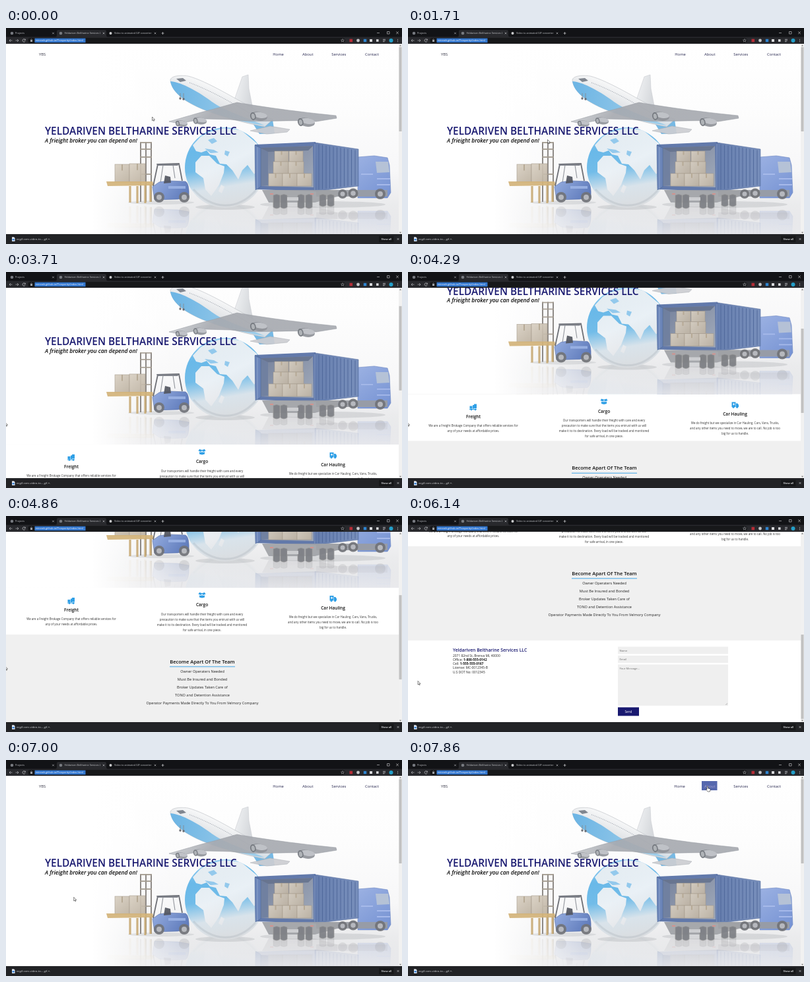
Animation of 600x328 px, one loop 8000 ms. Source, as an HTML page with a canvas:

```html
<!DOCTYPE html>
<html lang="en">
<head>
<meta charset="utf-8">
<title>Freight broker page</title>
<style>
html, body { margin: 0; width: 100%; height: 100%; overflow: hidden; background: #fff; }
canvas { display: block; width: 600px; height: 328px; }
</style>
</head>
<body>
<canvas id="stage"></canvas>
<script>
const LOOP = 8000, STEP = 1000 / 7;
const NAVY = '#191970', SKY = '#2f9fe6', INK = '#222';
const FACE = '"Open Sans", "Noto Sans", sans-serif';
const stage = document.getElementById('stage');
const dpr = window.devicePixelRatio || 1;
stage.width = 600 * dpr;
stage.height = 328 * dpr;
const c = stage.getContext('2d');

// [time, value] pairs, straight lines between them
const scrollKeys = [[3430, 0], [3714, 51], [4857, 204], [5857, 338], [6143, 338], [6571, 97], [6857, 0]];
const xKeys = [[143, 221.5], [1143, 211.5], [2714, 211.5], [3286, -1.5], [5143, -1.5], [5714, 15], [6857, 15], [7571, 453]];
const yKeys = [[143, 135], [1143, 169.5], [2714, 169.5], [3286, 228], [5143, 228], [5714, 250.5], [6857, 250.5], [7571, 40]];

function at(keys, t) {
  if (t <= keys[0][0]) return keys[0][1];
  for (let i = 1; i < keys.length; i++) {
    const [t0, a] = keys[i - 1], [t1, b] = keys[i];
    if (t <= t1) return a + (b - a) * (t - t0) / (t1 - t0);
  }
  return keys[keys.length - 1][1];
}

function box(color, x, y, w, h) {
  c.fillStyle = color;
  c.fillRect(x, y, w, h);
}

function shape(d, fill, stroke, width = 0.6) {
  const p = new Path2D(d);
  if (fill) { c.fillStyle = fill; c.fill(p); }
  if (stroke) { c.strokeStyle = stroke; c.lineWidth = width; c.stroke(p); }
}

function oval(color, x, y, rx, ry = rx, turn = 0) {
  c.fillStyle = color;
  c.beginPath();
  c.ellipse(x, y, rx, ry, turn, 0, Math.PI * 2);
  c.fill();
}

function text(s, x, y, size, color = INK, style = '', align = 'left') {
  c.font = `${style} ${size}px ${FACE}`;
  c.textAlign = align;
  c.textBaseline = 'alphabetic';
  c.fillStyle = color;
  c.fillText(s, x, y + size * 0.34);
}

function fade(x0, y0, x1, y1, ...colors) {
  const g = c.createLinearGradient(x0, y0, x1, y1);
  colors.forEach((k, i) => g.addColorStop(i / (colors.length - 1), k));
  return g;
}

function engine(x, y, s) {
  oval('#8f9399', x, y, 12 * s, 6.2 * s, 0.15);
  oval('#c3c6cb', x + 2 * s, y - 1.5 * s, 10 * s, 4 * s, 0.15);
  oval('#74787f', x - 8 * s, y, 4 * s, 5.6 * s, -0.2);
  oval('#b4b7bc', x - 8 * s, y, 2.4 * s, 3.8 * s, -0.2);
}

function plane() {
  shape('M345 112L358 74L367 71L368 92L375 128Z', fade(348, 90, 372, 95, '#eceef0', '#d3d6da'), '#c6c9ce');
  shape('M366 132L386 136L404 139L407 160L384 161Z', '#6cb4e2');
  shape('M370 156L400 149L430 154L426 158L395 161Z', '#ccced2', '#aeb1b6');
  shape('M249 79C250 73 262 71 276 73C304 80 352 110 404 139L392 150C350 142 300 128 272 110C258 100 250 90 249 79Z',
    fade(300, 85, 285, 120, '#f4f5f6', '#cfd3d8'), '#b3b6bc');
  shape('M249 81C263 82 285 92 312 112C332 126 354 132 392 148C350 142 300 128 272 110C259 101 251 92 249 81Z',
    fade(255, 85, 370, 140, '#63b1e4', '#98cbea'));
  shape('M258 77L268 76L273 80L264 82Z', '#767d87');
  c.setLineDash([1, 1.6]);
  shape('M278 83C310 95 340 112 372 131', null, '#838a96', 1);
  c.setLineDash([]);
  shape('M264 99V106M269 99V107', null, '#888', 0.9);
  oval('#62656b', 264, 107, 1.7);
  oval('#62656b', 269, 108, 1.7);
  shape('M247 142C266 137 290 129 315 123L350 113C400 122 460 129 500 133L501 137L470 142C430 138 380 145 340 139L300 138L262 145Z',
    fade(270, 120, 300, 145, '#c6c9cd', '#a7aab0'), '#989ba2');
  engine(266, 145, 0.75);
  engine(294, 141, 0.85);
  engine(383, 134, 1.08);
  engine(455, 143, 1.08);
}

function globe() {
  c.save();
  c.beginPath();
  c.arc(332, 212, 61, 0, Math.PI * 2);
  c.clip();
  box(fade(310, 151, 330, 273, '#8ccaf0', '#5db3e7', '#66b7e7', '#d7e2ea', '#d9dcdf'), 270, 150, 125, 125);
  const land = fade(290, 160, 340, 268, '#eceff1', '#f4f5f7', '#dde0e4');
  shape('M283 178L295 165L308 158L330 152L356 155L380 175L392 205L376 222L366 208L358 216L352 230L343 216L334 207L324 206L318 194L309 192L304 186L296 189L288 187Z', land);
  shape('M296 194L308 194L320 206L331 210L330 220L323 238L311 255L302 245L299 228L287 219L287 204Z', land);
  shape('M326 238l5 3l-4 10l-5-3Z', land);
  shape('M306 170l9-3l5 5l-8 4Z M332 186l7 2l-3 7l-5-3Z M301 183l14 2l7 4l-12 1Z', '#8cc6ec');
  c.restore();
  shape('M284 245C312 276 350 278 378 247', null, 'rgba(130,140,150,.2)', 3);
}

function crate(x, y, w, h) {
  box(fade(x, y, x + w, y + h, '#d8cfc1', '#bdb2a2'), x, y, w, h);
  c.strokeStyle = '#a3988a';
  c.lineWidth = 0.6;
  c.strokeRect(x, y, w, h);
  box('#b5a893', x + w / 2 - 1, y, 2, h * 0.35);
}

function wheel(x, y, r, hub = '#bcbec3') {
  oval('#717378', x, y, r);
  oval(hub, x, y, r * 0.5);
}

function forklift() {
  shape('M204 173V264M212 173V264M220 173V264', null, '#85817d', 2);
  shape('M203 174H221M203 184H221M203 196H221M203 222H221', null, '#a39b8f', 1.8);
  crate(165, 207, 22, 27);
  crate(187, 206, 24, 28);
  shape('M152 233L222 233L224 239L154 240Z', '#d3b47a');
  shape('M188 240V265M199 240V266M211 238V266M219 238V264', null, '#c9ac78', 3.2);
  shape('M223 240L230 207L262 206L267 232', null, '#63656c', 1.8);
  shape('M228 206H263L260 209H229Z', '#777a83');
  shape('M238 208L234 235M253 208L256 228', null, '#888b93', 1.1);
  shape('M222 241L232 234L246 232L272 233Q278 236 277 257L260 260L225 261Z',
    fade(225, 232, 265, 262, '#8aa4dc', '#5573b8'), '#4f68a4');
  shape('M241 224L249 226L250 235L239 236Z', '#53565f');
  shape('M246 240H272V244H246Z', '#9bb2e4');
  wheel(232, 257, 8);
  wheel(270, 257, 8);
}

function truck() {
  shape('M533 196L558 194L578 197L581 208L583 250L578 258L533 258Z', fade(535, 195, 583, 255, '#92aae0', '#6b8ad0'), '#6a83bd');
  shape('M560 203L579 203L581 219L562 220Z', '#b9c4d6');
  shape('M538 222H556M562 229H582M562 238H582', null, '#aabcec', 1.8);
  shape('M470 246H578V256H470Z', '#9a9da3');
  shape('M468 174L534 184L534 240L468 248Z', fade(468, 0, 534, 0, '#5a74a8', '#6d86b6'), '#526b9c');
  for (let x = 474; x < 533; x += 5.5) {
    const k = (x - 468) / 66;
    shape(`M${x} ${176 + k * 10}V${246 - k * 8}`, null, '#4f6899', 1);
  }
  shape('M377 177L469 173L470 248L378 245Z', '#566fa4');
  shape('M385 182L465 179L466 242L386 240Z', fade(385, 180, 440, 242, '#77829a', '#a0a8b6'));
  shape('M385 182L397 188V239L386 240Z', '#6f7f9f');
  shape('M385 182L465 179L458 186L397 188Z', '#66748f');
  crate(407, 187, 21, 16);
  crate(429, 187, 21, 16);
  crate(405, 203, 23, 18);
  crate(428, 203, 23, 18);
  crate(398, 221, 21, 19);
  crate(419, 221, 22, 19);
  crate(441, 221, 22, 19);
  shape('M377 178L386 182V241L378 246Z', '#6c87bb', '#4c6697');
  shape('M381 181V244M468 176V246', null, '#a4b5d6', 0.7);
  shape('M388 246H502V256L468 265H398Z', '#a0a2a7');
  for (const x of [410, 421, 447, 459, 480, 492]) {
    const h = x < 465 ? 21 : 18;
    shape(`M${x - 5} 254q5-3 10 0v${h - 3}q-5 4-10 0Z`, '#7d7f84', '#999', 0.8);
  }
  box('#d0d1d4', 426, 257, 17, 5);
  box('#d5928e', 400, 251, 5, 2);
  box('#d5928e', 461, 251, 5, 2);
  wheel(510, 252, 7);
  wheel(526, 251, 7.5);
  wheel(567, 252, 8);
}

function hero() {
  c.save();
  c.beginPath();
  c.rect(0, 24, 595, 289);
  c.clip();
  box(fade(0, 24, 0, 313, '#fff', '#fdfdfd', '#f7f7f8', '#e0e1e3'), 0, 24, 595, 289);
  c.save();
  c.translate(0, 536);
  c.scale(1, -1);
  c.globalAlpha = 0.2;
  globe();
  forklift();
  truck();
  c.restore();
  box(fade(0, 266, 0, 313, 'rgba(240,240,242,0)', 'rgba(236,236,239,.8)'), 0, 264, 595, 49);
  box(fade(130, 0, 260, 0, '#fff', 'rgba(255,255,255,0)'), 0, 24, 260, 289);
  oval('rgba(100,105,115,.16)', 332, 272, 45, 4);
  oval('rgba(100,105,115,.16)', 480, 268, 95, 5);
  oval('rgba(100,105,115,.14)', 235, 265, 50, 3);
  c.globalAlpha = 0.92;
  globe();
  plane();
  forklift();
  truck();
  c.restore();
}

function nav(hover) {
  text('YBS', 50, 40, 5.8, '#303040');
  text('Home', hover ? 403.3 : 404.3, 40, 5.85, '#25254d');
  if (hover) box('#5668ae', 445, 32, 23.5, 14);
  text('About', 449, 40, 5.85, hover ? '#aaa5d3' : '#25254d');
  text('Services', 493.2, 40, 5.85, '#25254d');
  text('Contact', 544, 40, 5.85, '#25254d');
}

function service(x, y, title, lines, top) {
  text(title, x, y, 6.5, '#111', '600', 'center');
  lines.forEach((s, i) => text(s, x, top + i * 7.9, 4.42, '#333', '', 'center'));
}

function icons() {
  shape('M93.5 331h4v4h-4Z M98 329.5h2v5.5h-2Z M100 328h4v6.5h-4Z M93 335.6h11v1h-11Z', SKY);
  oval(SKY, 96, 336.5, 1.4);
  oval(SKY, 102, 336.5, 1.4);
  shape('M293 320L297 321.2L301 320L302.5 322.8L298.5 324L297 322L295.5 324L291.5 322.8Z M293 324.4L296 325L297 323.5L298 325L301 324.4V327.5L297 328.5L293 327.5Z', SKY);
  shape('M490.5 325h6v7.5h-6Z M497 327h2.3l1.7 2.4v3.1h-4Z', SKY);
  box('#fff', 492, 327.8, 3.2, 1);
  box('#fff', 493.1, 326.7, 1, 3.2);
  oval(SKY, 493, 332.7, 1.5);
  oval(SKY, 498.6, 332.7, 1.5);
}

function page(scroll, hover) {
  c.save();
  c.beginPath();
  c.rect(0, 24, 595, 289);
  c.clip();
  box('#fff', 0, 24, 595, 289);
  c.translate(0, -scroll);
  hero();
  nav(hover);
  text('YELDARIVEN BELTHARINE SERVICES LLC', 59, 157, 15.4, NAVY, '600');
  text('A frieight broker you can depend on!', 59, 171, 8.45, '#0b0b0b', 'italic 600');

  icons();
  service(99, 347, 'Freight', [
    'We are a Freight Brokage Company that offers reliable services for',
    'any of your needs at affordable prices.'], 361);
  service(297, 339, 'Cargo', [
    'Our transporters will handle their freight with care and every',
    'precaution to make sure that the items you entrust with us will',
    'make it to its destination. Every load will be tracked and monitored',
    'for safe arrival, in one piece.'], 353.5);
  service(495.5, 343.5, 'Car Hauling', [
    'We do freight but we specialize in Car Hauling. Cars, Vans, Trucks,',
    'and any other items you need to move, we are to call. No job is too',
    'big for us to handle.'], 357.5);

  box('#f0f0f0', 0, 384, 595, 143);
  text('Become Apart Of The Team', 297.5, 425, 7.5, '#111', '600', 'center');
  box(SKY, 248, 432.4, 99, 0.9);
  ['Owner Operaters Needed', 'Must Be Insured and Bonded', 'Broker Updates Taken Care of',
    'TONO and Detention Assistance', 'Operator Payments Made Directly To You From Velmory Company']
    .forEach((s, i) => text(s, 297.5, 440 + i * 12.15, 5.55, INK, '', 'center'));

  text('Yeldariven Beltharine Services LLC', 68, 542, 6.8, NAVY, '600');
  const label = (a, b, y) => {
    text(a, 68, y, 4.9);
    const w = c.measureText(a).width;
    if (b) text(b, 68 + w, y, 4.9, '#111', '700');
  };
  label('2071 82nd St, Brenva MI, 40000', '', 550);
  label('Office: ', '1-800-555-0142', 556.2);
  label('Cell: ', '1-555-555-0167', 562.5);
  label('License: MC-0012345-B', '', 568.8);
  label('U.S DOT No: 0012345', '', 575);

  [['Name', 536.5, 11], ['Email', 550, 11], ['Your Message...', 563.5, 62.5]].forEach(([s, y, h]) => {
    box('#efefef', 318, y, 167, h);
    text(s, 320.5, y + 5.8, 4.2, '#6f6f6f');
  });
  shape('M481 625l3-3m-1.5 3l1.5-1.5', null, '#999', 0.5);
  box(NAVY, 318, 628.5, 32, 13);
  text('Send', 334, 635, 4.7, '#fff', '', 'center');
  c.restore();

  box('#f1f1f1', 595, 24, 5, 289);
  box('#c1c1c1', 595.5, 29 + scroll * 0.447, 4, 128);
  shape('M596 27.5l1.5-2l1.5 2Z M596 309.8l1.5 2l1.5-2Z', '#777');
}

function cross(x, y, r = 1.5, color = '#c4c6ca') {
  shape(`M${x - r} ${y - r}l${2 * r} ${2 * r}m0 ${-2 * r}l${-2 * r} ${2 * r}`, null, color, 0.6);
}

function tab(x, title, closeX) {
  c.save();
  c.beginPath();
  c.rect(x, 2, closeX - x - 5, 12);
  c.clip();
  text(title, x, 8, 3.75, '#c9cbcf');
  c.restore();
  cross(closeX, 8, 1.3);
}

function browser() {
  box('#121316', 0, 0, 600, 14);
  shape('M75 14Q77 13 77 11V5Q77 3 79 3H150Q152 3 152 5V11Q152 13 154 14Z', '#28292d');
  box('#28292d', 0, 13.5, 600, 10.5);
  oval('#777a80', 9, 8, 2.3);
  tab(14, 'Projects', 71.5);
  oval('#777a80', 83, 8, 2.3);
  tab(88.5, 'Yeldariven Beltharine Services LLC', 148);
  oval('#c9cacc', 158.5, 8, 2);
  tab(164, 'Video to animated GIF converter', 226);
  shape('M235.5 8h4m-2-2v4', null, '#d0d1d4', 0.7);
  shape('M562 7.5h4M577.5 5.5h3.5v3.5h-3.5Z', null, '#d5d6d8', 0.6);
  cross(593, 7.3, 1.8, '#e0e0e0');

  shape('M9.5 19H5m2-2l-2 2l2 2M14.5 19H19m-2-2l2 2l-2 2', null, '#b5b7bb', 0.7);
  shape('M29 17.6A2.2 2.2 0 1 0 29.2 20M29.3 16.6v1.8h-1.8', null, '#c9cbcf', 0.7);
  shape('M37 15H508Q514 15 514 19T508 23H37Q33 23 33 19T37 15Z', '#17181a');
  box('#b3b5b9', 37, 18.3, 3, 2.5);
  shape('M37.7 18.3v-1q.8-1.3 1.6 0v1', null, '#b3b5b9', 0.6);
  box('#3478d0', 43.5, 15.6, 77, 6.6);
  text('mirovek.github.io/Prosperity/index.html', 44.5, 19, 3.9, '#f2f7ff');
  shape('M510 16.5l.7 1.7h1.8l-1.4 1.1l.5 1.8l-1.6-1l-1.6 1l.5-1.8l-1.4-1.1h1.8Z', null, '#b5b7bb', 0.5);
  box('#b52d36', 520.5, 16.7, 4.6, 4.6);
  oval('#c7c8cb', 533.5, 19, 2.4);
  box('#2f85d0', 541.8, 16.8, 4.4, 4.4);
  box('#d9dadd', 551, 17, 4, 4);
  box('#d9dadd', 561, 17.2, 3.6, 3.6);
  shape('M571 17.3h4M571 19h4M571 20.7h2.6', null, '#c9cbcf', 0.7);
  oval('#239fc9', 583.5, 19, 3);
  for (const y of [17.2, 19, 20.8]) oval('#c9cbcf', 593.5, y, 0.5);

  box('#222326', 0, 313, 600, 15);
  shape('M9 317.5h3l1.5 1.5v5h-4.5Z', '#e7edf5');
  box('#3f87d8', 9.6, 320, 3, 2.7);
  text('ezgif.com-video-to....gif', 16, 320.7, 4.3, '#d3d5d8');
  shape('M63.5 321.5l1.5-1.5l1.5 1.5', null, '#b8babd', 0.6);
  box('#17181a', 565, 315.8, 22.5, 9.4);
  text('Show all', 576.3, 320.6, 3.95, '#eceef0', '600', 'center');
  cross(594, 320.5, 1.5, '#d5d6d8');
}

function pointer(x, y, hand) {
  c.save();
  c.translate(x, y);
  if (hand) {
    shape('M0 0Q1 -.8 1.6 .2V3L4.5 3.7Q5.3 4 5 5.5L4.3 8H1.2L-1.5 5Q-1.8 4 -.8 4.2L0 4.8Z', '#fff', '#222', 0.6);
  } else {
    shape('M0 0V5.7L1.3 4.5L2.2 6.4L3.1 6L2.2 4.2H4Z', '#fff', '#222', 0.55);
  }
  c.restore();
}

function draw(t) {
  const hover = t >= 7560;
  c.setTransform(dpr, 0, 0, dpr, 0, 0);
  page(at(scrollKeys, t), hover);
  browser();
  pointer(at(xKeys, t), at(yKeys, t), hover);
}

const start = performance.now();
function tick() {
  const t = (performance.now() - start) % LOOP;
  draw(Math.floor((t + 5) / STEP) * STEP);
  requestAnimationFrame(tick);
}
tick();
</script>
</body>
</html>
```
